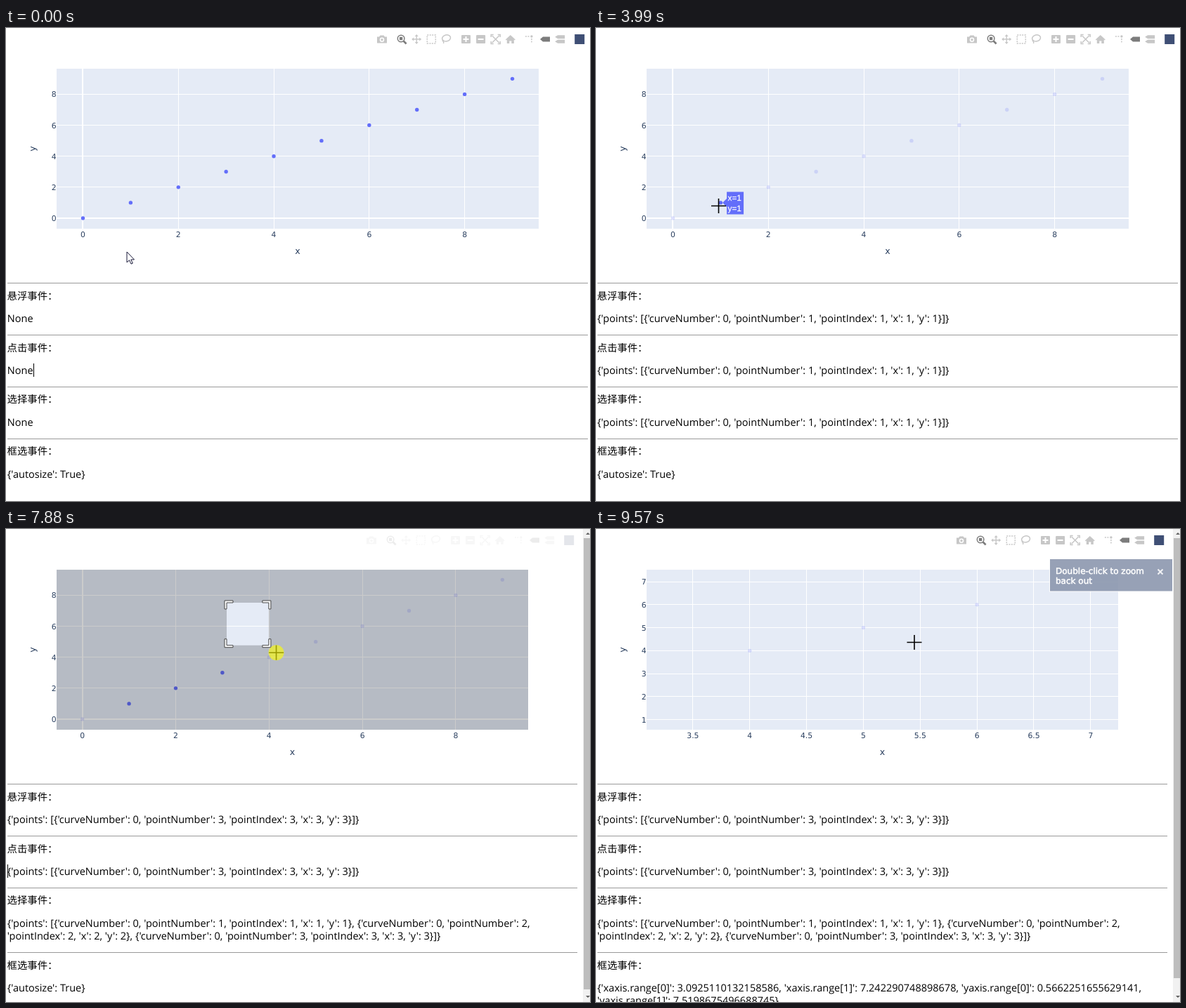
Recreate the animation shown at these times as an HTML page. Size 831 by 674 pixels, loop 9.67 s.

```html
<!DOCTYPE html>
<html lang="zh-CN">
<head>
<meta charset="utf-8">
<title>Scatter plot events</title>
<style>
html, body { margin: 0; width: 100%; height: 100%; overflow: hidden; background: #fff; }
svg { display: block; width: 831px; height: 674px; }
text { text-rendering: geometricPrecision; white-space: pre; }
.body { font: 14.5px "Open Sans", "Noto Sans", sans-serif; }
.label { font: 14.4px "Noto Sans CJK SC", "Noto Sans CJK", sans-serif; }
.tick { font: 10.8px "DejaVu Sans", sans-serif; fill: #2a3f5f; }
.title { font: 12.6px "DejaVu Sans", sans-serif; fill: #2a3f5f; text-anchor: middle; }
.tip { font: 11.7px "Liberation Sans", sans-serif; fill: #fff; stroke: #fff; stroke-width: .25; }
.note { font: 12px "DejaVu Sans", sans-serif; fill: #fff; stroke: #fff; stroke-width: .5; }
.icon { color: #c7c7c7; fill: currentColor; }
.icon.on { color: #7c7c7c; }
.line { fill: none; stroke: currentColor; stroke-width: 1.5; }
.gap { fill: none; stroke: #fff; stroke-width: 2; }
.crisp { shape-rendering: crispEdges; }
</style>
</head>
<body>
<svg id="stage" viewBox="0 0 831 674">
  <clipPath id="clip"><rect id="clipBox" x="72" y="58" width="686" height="228"/></clipPath>
  <g id="plots"></g>
  <g id="zoom">
    <path id="shade" fill-rule="evenodd"/>
    <path id="corners" fill="#fff" stroke="#444"/>
  </g>
  <g id="tip">
    <path d="M0,0l6,-6v-9.5h24v32h-24v-10.5z" fill="#636efa"/>
    <text class="tip" x="7.5" y="-3"></text>
    <text class="tip" x="7.5" y="12"></text>
  </g>
  <g id="bar"></g>
  <g id="page"></g>
  <rect id="caret" y="478" width="1" height="19" class="crisp"/>
  <g id="note">
    <rect x="645.5" y="42.5" width="175" height="46.5" fill="rgba(140,151,175,.9)" stroke="#fff"/>
    <text class="note" x="654" y="63.5">Double-click to zoom</text>
    <text class="note" x="654" y="77.5">back out</text>
    <path d="M799.5,57.5l7,7m0,-7l-7,7" class="gap" opacity=".85"/>
  </g>
  <g id="scroll">
    <rect x="821" width="10" height="674" fill="#f1f1f1"/>
    <rect id="thumb" x="822" y="13" width="9" fill="#bdbdbd"/>
    <path d="M825,8l3,-3l3,3zM825,665l3,3l3,-3z" fill="#606060"/>
  </g>
  <g id="cursor">
    <path id="cross" d="M-10.5,0h21M0,-10.5v21" stroke="#000" stroke-width="1.6"/>
    <path id="arrow" d="M0,0v15l3.5,-3.2l2.5,5.4l2.3,-1l-2.5,-5.2h4.7z" fill="#fff" stroke="#1a1a3a"/>
    <circle id="press" fill="rgba(255,255,0,.6)"/>
  </g>
</svg>
<script>
const LOOP = 9670;
const SCROLL_AT = 5170, RESIZE_AT = 5350, DRAG_AT = 7700, DROP_AT = 8430, ZOOM_AT = 8480, RANGE_AT = 8560;
const CLICKS = [3510, 5000, 6260], HOLD = 130;
const PRESSES = [...CLICKS.map(c => [c, c + HOLD]), [DRAG_AT, DROP_AT]];

// Pointer moves: begin, end, x, y
const HOME = [172, 319];
const MOVES = [
  [110, 490, 106, 264], [670, 1050, 108, 261], [1410, 1920, 172, 255],
  [2070, 2620, 174.5, 253.5], [4520, 4770, 244, 227], [5400, 5950, 308.5, 208],
  [7090, 7550, 314, 105], [DRAG_AT, 7880, 384, 176], [7880, 8250, 588, 259],
  [8500, 9570, 453, 161.5]
];

const $ = id => document.getElementById(id);
const show = (el, on) => el.setAttribute('display', on ? 'inline' : 'none');
const attr = (el, o) => { for (const k in o) el.setAttribute(k, o[k]); };
const put = (el, s = '') => { if (el.textContent !== s) el.textContent = s; };
const clamp = k => Math.max(0, Math.min(1, k));
const ramp = (t, from, ms) => clamp((t - from) / ms);

function pointer(t) {
  let [x, y] = HOME;
  for (const [a, b, tx, ty] of MOVES) {
    const k = ramp(t, a, b - a);
    x += (tx - x) * k;
    y += (ty - y) * k;
  }
  return [x, y];
}

// Plots
const view = (w, xa, xb, ya, yb, xs, ys) => ({ w, xa, ya, dx: w / (xb - xa), dy: 228 / (yb - ya), xb, yb, xs, ys });
const views = [
  view(686, -.552, 9.552, -.68, 9.65, 2, 2),
  view(671, -.552, 9.552, -.68, 9.65, 2, 2),
  view(671, 3.0925, 7.2423, .5662, 7.5199, .5, 1)
];
const px = (v, n) => 72 + (n - v.xa) * v.dx;
const py = (v, n) => 286 - (n - v.ya) * v.dy;
const viewAt = t => t < RESIZE_AT ? 0 : t < ZOOM_AT ? 1 : 2;

function ticks(a, b, step) {
  const out = [];
  for (let n = Math.ceil(a / step) * step; n < Math.min(b, 9); n += step) out.push(n + 0 || 0);
  return out;
}

function plot(v) {
  const xt = ticks(v.xa, v.xb, v.xs), yt = ticks(v.ya, v.yb, v.ys);
  let s = `<rect x="72" y="58" width="${v.w}" height="228" fill="#e5ebf6"/><g class="crisp" stroke="#fff">`;
  for (const n of xt) s += `<path d="M${px(v, n)},58v228" stroke-width="${n ? 1 : 2}"/>`;
  for (const n of yt) s += `<path d="M72,${py(v, n)}h${v.w}" stroke-width="${n ? 1 : 2}"/>`;
  s += '</g><g clip-path="url(#clip)" fill="#636efa">';
  for (let n = 0; n < 10; n++) s += `<circle class="dot" cx="${px(v, n)}" cy="${py(v, n)}" r="2.7"/>`;
  s += '</g>';
  for (const n of xt) s += `<text class="tick" text-anchor="middle" x="${px(v, n)}" y="297.5">${n}</text>`;
  for (const n of yt) s += `<text class="tick" text-anchor="end" x="71.5" y="${py(v, n) + 4}">${n}</text>`;
  s += `<text class="title" x="${72 + v.w / 2}" y="322">x</text>`;
  return `<g>${s}<text class="title" transform="translate(42,172) rotate(-90)">y</text></g>`;
}
$('plots').innerHTML = views.map(plot).join('');
const plots = [...$('plots').children];
const dots = plots.map(p => [...p.querySelectorAll('.dot')]);

// Toolbar
const line = (d, more = '') => `<path class="line" d="${d}" ${more}/>`;
const box = '<rect x="-6.5" y="-6" width="13" height="12" rx="1"/>';
const tag = (y, h) => `<path d="M-7,${y}l4,${-h / 2}h10v${h}h-10z"/>`;
const turn = s => [0, 90, 180, 270].map(a => `<g transform="rotate(${a})">${s}</g>`).join('');
const active = s => `<g class="icon on">${s}</g>`;
const tools = [
  ['<path d="M-7,-3.5h3l1.5,-2h5l1.5,2h3v9h-14z"/><circle class="gap" cy=".8" r="2.5" style="stroke-width:1.5"/>'],
  [
    active('<circle class="line" cx="-1" cy="-1" r="4.8"/><rect x="-3.2" y="-3.2" width="4.4" height="4.4"/>' + line('M2.5,2.5l4,4', 'style="stroke-width:2.6"')),
    turn('<path d="M0,-7l2.5,3h-1.800v4h-1.400v-4h-1.800z"/>'),
    line('M-6,-6h12v12h-12z', 'stroke-dasharray="2 1.43"'),
    '<ellipse class="line" cx=".5" cy="-1.5" rx="6" ry="4.5" transform="rotate(-12)"/>' + line('M-5,1c-1,2 3,2 1,5')
  ],
  [
    box + '<path class="gap" d="M-4,0h8M0,-4v8"/>',
    box + '<path class="gap" d="M-4,0h8"/>',
    turn(line('M-6.5,-3v-3.5h3.5M-5,-5l5,5')),
    '<path d="M0,-6l7,6.500l-1,1l-1,-.9v5.400h-3.500v-3.500h-3v3.500h-3.500v-5.400l-1,.9l-1,-1z"/>'
  ],
  [
    line('M-7,-4h7M2,-1v6', 'stroke-dasharray="2 1.5"') + '<circle cx="2" cy="-4" r="1.7"/>',
    active(tag(0, 7)),
    tag(-3.3, 5) + tag(3.3, 5)
  ],
  ['<rect x="-7" y="-7" width="14" height="14" fill="#3f4f75"/>']
];
let barX = 535, bar = '';
for (const group of tools) {
  for (const s of group) {
    bar += `<g class="icon" transform="translate(${barX},16)">${s}</g>`;
    barX += 21.1;
  }
  barX += 7;
}
$('bar').innerHTML = bar;

// Event log
const names = ['悬浮事件：', '点击事件：', '选择事件：', '框选事件：'];
$('page').innerHTML = names.map(n => `<g><rect class="crisp" x="2" height="1" fill="#999"/>
  <text class="label" x="1.5" y="23.7">${n}</text>
  <text class="body" x="1.8" y="56"></text><text class="body" x="1.8" y="74.4"></text></g>`).join('');
const rows = [...$('page').children];

const head = n => `{'curveNumber': 0, 'pointNumber': ${n},`;
const tail = n => `'pointIndex': ${n}, 'x': ${n}, 'y': ${n}}`;
const one = n => [n < 0 ? 'None' : `{'points': [${head(n)} ${tail(n)}]}`];
function chosen(n) {
  if (n < 2) return one(n || -1);
  const more = n > 2 ? `, ${head(3)} ${tail(3)}` : '';
  return [`{'points': [${head(1)} ${tail(1)}, ${head(2)}`, `${tail(2)}${more}]}`];
}
const ranges = [
  "{'xaxis.range[0]': 3.0925110132158586, 'xaxis.range[1]': 7.242290748898678, 'yaxis.range[0]': 0.5662251655629141,",
  "'yaxis.range[1]': 7.5198675496688745}"
];

// Point within reach of the pointer, or -1
function hover(t) {
  if (t > DRAG_AT && t < ZOOM_AT) return -1;
  const v = views[viewAt(t)], [x, y] = pointer(t);
  for (let n = 0; n < 10; n++) if (Math.hypot(px(v, n) - x, py(v, n) - y) < 18) return n;
  return -1;
}
function lastHover(t) {
  for (let s = t; s > 0; s -= 20) {
    const n = hover(s);
    if (n >= 0) return n;
  }
  return -1;
}
const clicked = t => CLICKS.filter(c => c + HOLD <= t).length;

function caretOn(t) {
  const from = t < 7800 ? -50 : 7800;
  return Math.floor((t - from) / 530) % 2 === 0;
}

function drawLog(t) {
  const n = clicked(t - 30), wide = t < SCROLL_AT;
  const text = [one(lastHover(t - 60)), one(n || -1), chosen(n), t < RANGE_AT ? ["{'autosize': True}"] : ranges];
  rows.forEach((g, i) => {
    const y = 363.4 + i * 73.7 + (i === 3 && n > 1 ? 18.4 : 0);
    const [rule, , a, b] = g.children;
    g.setAttribute('transform', `translate(0,${y})`);
    rule.setAttribute('width', wide ? 826 : 811);
    put(a, text[i][0]);
    put(b, text[i][1]);
  });
  $('caret').setAttribute('x', n ? 2 : 39);
  show($('caret'), caretOn(t));
  show($('scroll'), !wide);
  $('thumb').setAttribute('height', t < RANGE_AT ? 643 : 627);
}

// The toolbar fades while the button is held.
function barOpacity(t) {
  let fade = 0;
  for (const [a, b] of PRESSES) fade = Math.max(fade, ramp(Math.min(t, b), a, 210) - Math.max(0, t - b) / 120);
  return 1 - fade;
}

function drawPlot(t) {
  const id = viewAt(t), v = views[id], sel = clicked(t), h = hover(t);
  plots.forEach((p, i) => show(p, i === id));
  $('clipBox').setAttribute('width', v.w);
  dots[id].forEach((d, n) => d.setAttribute('opacity', !sel || (n && n <= sel) ? 1 : .2));
  attr($('bar'), { opacity: barOpacity(t), transform: `translate(${id ? -15 : 0},0)` });

  show($('tip'), h >= 0);
  if (h >= 0) {
    $('tip').setAttribute('transform', `translate(${px(v, h) + 2.7},${py(v, h)})`);
    const [a, b] = $('tip').querySelectorAll('text');
    put(a, 'x=' + h);
    put(b, 'y=' + h);
  }
  $('note').setAttribute('opacity', ramp(t, ZOOM_AT, 520));
}

function drawZoom(t) {
  const on = t > DRAG_AT + 50 && t < ZOOM_AT;
  show($('zoom'), on);
  if (!on) return;
  const [x, y] = pointer(t - 27), l = 314, top = 105;
  attr($('shade'), {
    d: `M72,58h671v228h-671zM${l},${top}H${x}V${y}H${l}z`,
    'fill-opacity': .4 * ramp(t, DRAG_AT + 80, 200)
  });
  const len = Math.min(9, (x - l) / 2, (y - top) / 2);
  const corner = (cx, cy, sx, sy) =>
    `M${cx - 3 * sx},${cy + len * sy}h${3 * sx}v${-len * sy}h${len * sx}v${-3 * sy}h${-(len + 3) * sx}z`;
  attr($('corners'), {
    d: corner(l, top, 1, 1) + corner(x, top, -1, 1) + corner(x, y, -1, -1) + corner(l, y, 1, -1),
    opacity: ramp(t, DRAG_AT + 40, 100)
  });
}

function drawCursor(t) {
  const [x, y] = pointer(t);
  $('cursor').setAttribute('transform', `translate(${x},${y})`);
  show($('arrow'), y >= 286);
  show($('cross'), y < 286);
  let r = 0;
  for (const [a, b] of PRESSES) if (t >= a) r = 11 * (1 - ramp(t, b, 100));
  $('press').setAttribute('r', r);
}

const start = performance.now();
function frame() {
  const t = (performance.now() - start) % LOOP;
  drawPlot(t);
  drawZoom(t);
  drawLog(t);
  drawCursor(t);
  requestAnimationFrame(frame);
}
frame();
</script>
</body>
</html>
```
